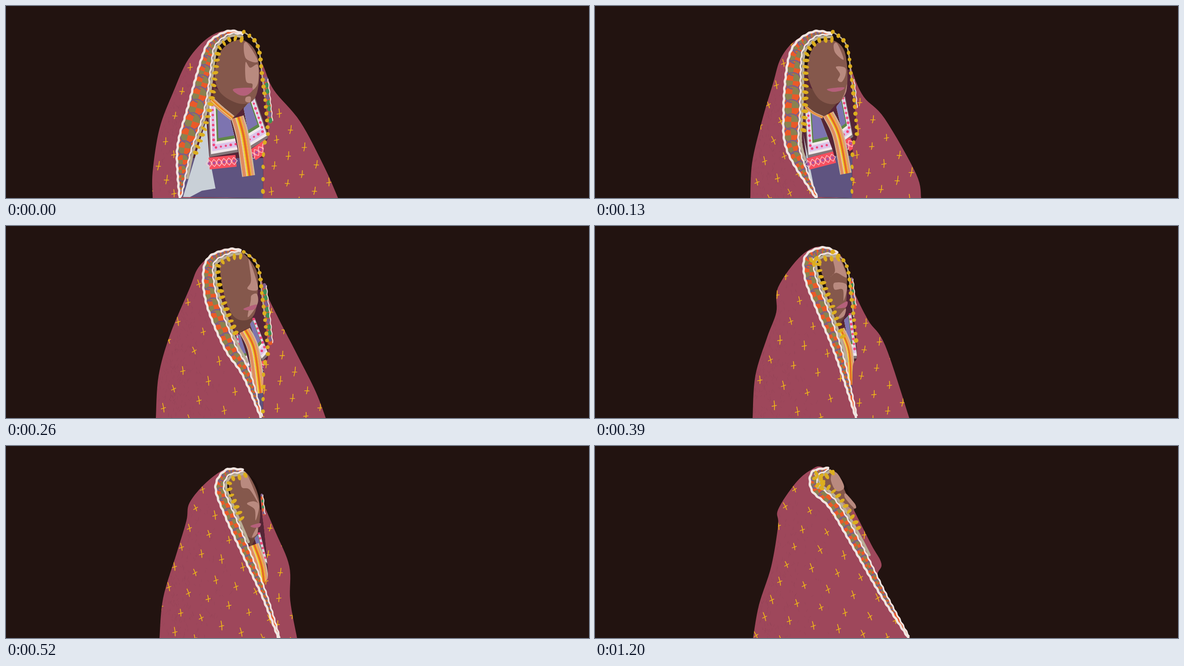
Recreate the animation shown at these times as an HTML page with a canvas. Size 1280 px wide and 423 px high, loop 1560 ms.

```html
<!DOCTYPE html>
<html lang="en">
<head>
<meta charset="utf-8">
<title>Turning figure</title>
<style>
html, body { margin: 0; width: 100%; height: 100%; overflow: hidden; background: #221310; }
canvas { display: block; width: 100vw; height: 100vh; }
</style>
</head>
<body>
<canvas id="stage" width="1280" height="423"></canvas>
<script>
const ctx = document.getElementById('stage').getContext('2d');
const W = 1280, H = 423, STEP = 130, LOOP = 1560;
const C = {
  night: '#221310', shawl: '#9e475b', shade: '#75374a', hair: '#1b0e0c', wine: '#552536',
  skin: '#85584c', neck: '#6b443a', light: '#b98a7f', lips: '#b5607a',
  cream: '#f1e5e1', beige: '#b9ad96', orange: '#ea5a28', ring: '#7d5d88', olive: '#8a8250',
  gold: '#dcae1f', stitch: '#f0b816', leaf: '#3f8e56', dress: '#5f5480', sleeve: '#c9d0d7',
  red: '#f8505f', pink: '#f0457a'
};
// Nested layers of an embroidered panel: size and colour
const PANEL = [[1, '#85777a'], [0.93, '#f1e8eb'], [0.86, '#dcc3e8'], [0.7, '#f1e8eb'], [0.63, '#5f8748'], [0.55, '#7d74b0']];
// Stripes across the front placket: weight and colour
const STRIPES = [[2, '#cfc0a0'], [7, '#e08b60'], [2, '#e8c9a8'], [3, '#f0d12c'], [5, '#e66a26'], [2, '#f0c02c'], [5, '#e59a70'], [2, '#cfc0a0']];
// The far side of the hood opening is common to all poses
const EDGE = '522 57 545 75 556 100 562 150 568 200 575 285 566 312 564 423';

// Key points of each pose. border: greatest width and where it lies;
// fringe, rim: how far down the beads reach; marks: lattice origin and its two steps.
const poses = [
  {
    shawl: '322 423 322 365 337 270 367 190 400 118 445 69 490 54 535 70 564 130 588 185 646 255 700 357 729 423',
    outer: '520 60 488 55 447 78 428 120 400 220 376 315 381 423', border: [34, 1.25],
    fringe: 331, rim: 423, side: [160, 255, 9],
    neck: '456 180 454 208 500 247 532 213',
    face: '458 145 475 95 515 74 548 100 556 155 545 205 512 215 470 190',
    lights: ['522 86 530 82 553 122 527 116', '526 124 536 136 553 130 553 170 540 186 541 172 527 165', '527 201 537 200 536 212 526 210'],
    lips: '499 183 541 181 530 196 512 196',
    waist: 335, sleeve: '440 250 410 350 388 423 400 423 430 407 460 402 446 330',
    panels: ['490 240 443 212 447 333 510 322', '522 225 546 199 577 290 538 314'],
    belts: ['446 347 505 341', '541 329 576 305'],
    plackets: [['450 206 474 228 500 249', 12], ['508 245 520 290 533 377', 28]],
    marks: [406, 135, -18, 54, 0, 85], far: [598, 235], lean: 6
  },
  {
    shawl: '341 423 345 345 366 255 391 170 408 115 440 76 490 54 545 75 565 145 590 200 636 248 705 370 716 423',
    outer: '520 60 480 56 440 82 422 130 414 230 422 320 485 423', border: [33, 1],
    fringe: 290, rim: 423, side: [160, 225, 4],
    neck: '462 175 464 222 503 246 533 212',
    face: '466 145 480 90 515 74 548 100 553 180 530 215 490 203',
    lights: ['524 86 532 83 546 118 528 104', '529 134 549 136 550 152 542 167 533 163 538 150', '553 172 551 190 540 210 548 192'],
    lips: '510 183 546 179 541 186 522 189',
    waist: 330, sleeve: '457 280 474 405 481 400 468 335',
    panels: ['495 247 460 226 467 334 523 321', '530 222 549 198 567 288 548 302'],
    belts: ['468 348 526 333', '552 309 566 300'],
    plackets: [['462 222 480 236 502 246', 6], ['512 238 534 285 551 370', 25]],
    marks: [414, 127, -17, 45, 10, 80], far: [583, 213], lean: -16
  },
  {
    shawl: '329 423 335 330 360 240 402 140 422 92 455 62 490 50 545 72 568 140 600 207 640 285 680 365 702 423',
    outer: '515 53 490 51 447 67 433 105 441 175 480 270 520 330 560 423', border: [24, 0.9],
    fringe: 250, rim: 423, side: [130, 258, 9],
    neck: '490 190 505 238 538 222 542 200',
    face: '469 84 490 62 515 56 546 90 553 125 545 195 510 206 484 170',
    lights: ['533 72 552 128 550 142 530 138 538 120', '539 153 551 150 552 172 531 201 537 166'],
    lips: '522 182 549 173 546 183 530 186',
    waist: 318,
    panels: ['514 240 505 238 518 320 537 312', '536 216 546 202 577 283 563 298'],
    belts: ['523 328 540 324', '564 311 576 306'],
    plackets: [['524 230 544 275 557 370', 25]],
    marks: [422, 125, -22, 42, 34, 66], far: [583, 188], lean: -12
  },
  {
    shawl: '346 423 352 330 378 245 398 190 402 135 453 65 500 45 545 72 567 140 600 208 637 263 690 423',
    outer: '532 58 500 47 462 66 461 115 487 185 528 285 573 423', border: [21, 0.65],
    fringe: 250, rim: 262, side: [115, 180, 6],
    neck: '520 185 530 228 548 200',
    face: '493 77 525 56 550 95 553 130 548 195 528 198 505 125',
    lights: ['519 58 533 63 553 112 530 103 517 112 527 98', '526 125 553 130 546 165 544 140 526 140', '550 182 547 198 532 204'],
    lips: '530 180 553 166 552 178 540 181',
    waist: 310,
    panels: ['529 245 520 242 528 303 547 297', '547 207 563 191 577 292 563 292'],
    belts: ['529 313 551 309'],
    plackets: [['538 228 556 275 561 352', 20]],
    marks: [420, 108, -22, 43, 30, 57], far: [596, 215], lean: -7
  },
  {
    shawl: '337 423 345 335 375 235 396 165 403 125 440 80 485 50 525 58 552 100 592 190 622 265 624 340 639 423',
    outer: '520 52 482 53 460 90 480 152 530 262 564 335 598 423', border: [17, 0.65],
    fringe: 162, rim: 0, side: [108, 153, 5],
    neck: '520 180 537 225 553 192',
    face: '488 74 522 55 550 97 558 150 549 198 530 198 510 160',
    lights: ['517 57 530 64 556 128 535 96 517 90', '529 127 545 122 556 132 548 164 546 140', '551 179 552 193 540 201'],
    lips: '537 176 558 170 557 178 545 180',
    waist: H,
    panels: ['546 203 558 190 576 262 560 250'],
    belts: [],
    plackets: [['543 218 560 268 567 330', 25]],
    marks: [431, 94, -15, 43, 29, 57], far: [581, 180], lean: -14
  },
  {
    shawl: '347 423 360 350 387 265 402 175 402 140 440 82 472 54 500 47 545 90 568 140 607 218 629 260 623 300 692 423',
    outer: '512 48 476 58 476 98 514 135 562 215 625 325 688 423', border: [18, 0.65],
    fringe: 190, rim: 60,
    neck: '542 125 563 148 566 180',
    face: '494 80 515 57 533 62 553 108 572 130 563 148 562 160 530 122',
    lights: ['522 58 534 63 547 91 530 99 518 76', '551 105 572 130 569 137 549 114', '540 121 562 139 560 146 548 140'],
    waist: H,
    panels: [], belts: [], plackets: [],
    marks: [436, 95, -17, 39, 37, 48], far: [592, 193], lean: -18
  }
];

let seed = 1;
const rnd = () => (seed = seed * 16807 % 2147483647) / 2147483647;
const jitter = a => (rnd() * 2 - 1) * a;
const mix = (a, b, t) => a.map((v, k) => v + (b[k] - v) * t);

function points(text) {
  const n = text.split(' ').map(Number), out = [];
  for (let i = 0; i < n.length; i += 2) out.push([n[i], n[i + 1]]);
  return out;
}

// Catmull-Rom curve through the points
function curve(text, closed) {
  const p = points(text), n = p.length, out = [];
  const at = i => closed ? p[(i + n) % n] : p[Math.max(0, Math.min(n - 1, i))];
  for (let i = 0; i < (closed ? n : n - 1); i++) {
    const [a, b, c, d] = [at(i - 1), at(i), at(i + 1), at(i + 2)];
    for (let t = 0; t < 1; t += 0.125) {
      out.push([0, 1].map(k => b[k] + 0.5 * t * (c[k] - a[k] +
        t * (2 * a[k] - 5 * b[k] + 4 * c[k] - d[k] + t * (3 * (b[k] - c[k]) + d[k] - a[k])))));
    }
  }
  if (!closed) out.push(p[n - 1]);
  return out;
}

// Evenly spaced places on a path, each with its direction
function along(path, step) {
  const out = [];
  let left = 0;
  for (let i = 1; i < path.length; i++) {
    const [x, y] = path[i - 1], dx = path[i][0] - x, dy = path[i][1] - y, len = Math.hypot(dx, dy);
    for (; left < len; left += step) out.push({ x: x + dx * left / len, y: y + dy * left / len, a: Math.atan2(dy, dx) });
    left -= len;
  }
  return out;
}

// Parallel path; the distance may depend on the share of the way
function shift(path, dist, step = 3) {
  return along(path, step).map(({ x, y, a }, i, all) => {
    const d = typeof dist === 'function' ? dist(i / all.length, i) : dist;
    return [x - Math.sin(a) * d, y + Math.cos(a) * d];
  });
}
const between = (path, top, bottom) => path.filter(([, y]) => y >= top && y <= bottom);

function trace(path) {
  ctx.beginPath();
  path.forEach(([x, y]) => ctx.lineTo(x, y));
}
function fill(color, path) {
  trace(path);
  ctx.closePath();
  ctx.fillStyle = color;
  ctx.fill();
}
function stroke(color, width, path) {
  trace(path);
  ctx.strokeStyle = color;
  ctx.lineWidth = width;
  ctx.stroke();
}
function dot(color, x, y, rx, ry = rx, a = 0) {
  ctx.beginPath();
  ctx.ellipse(x, y, rx, ry, a, 0, 7);
  ctx.fillStyle = color;
  ctx.fill();
}
function clipped(path, draw) {
  ctx.save();
  trace(path);
  ctx.clip();
  draw();
  ctx.restore();
}
const rightOf = path => [[path[0][0], 0], ...path, [W, H], [W, 0]];
const leftOf = path => [[path[0][0], 0], ...path, [0, H], [0, 0]];

const ruffle = (path, width) => stroke(C.cream, width, shift(path, (s, i) => Math.sin(i * 0.8) * 0.7, 2));

function border(outer, inner) {
  const shape = [...outer, ...inner.slice().reverse()];
  fill(C.orange, shape);
  clipped(shape, () => {
    const a = along(outer, 1), b = along(inner, 1);
    for (let s = 0.02, r; s < 1; s += Math.max(r * 1.75, 7) / a.length) {
      const p = a[Math.floor(s * a.length)], q = b[Math.floor(s * b.length)];
      const x = (p.x + q.x) / 2, y = (p.y + q.y) / 2;
      r = Math.hypot(p.x - q.x, p.y - q.y) / 2;
      if (r < 4) continue;
      ctx.fillStyle = C.olive;
      for (const turn of [0, Math.PI]) {
        ctx.beginPath();
        ctx.moveTo(x, y);
        ctx.arc(x, y, r, p.a + turn, p.a + turn + Math.PI / 2);
        ctx.fill();
      }
      ctx.strokeStyle = C.ring;
      ctx.lineWidth = 2.6;
      ctx.beginPath();
      ctx.arc(x, y, r, 0, 7);
      ctx.stroke();
    }
  });
}

function placket([text, width]) {
  const path = curve(text), unit = width / STRIPES.reduce((sum, [w]) => sum + w, 0);
  let d = width / 2;
  ctx.lineCap = 'butt';
  for (const [w, color] of STRIPES) {
    stroke(color, w * unit + 0.5, shift(path, d - w * unit / 2));
    d -= w * unit;
  }
  ctx.lineCap = 'round';
}

// Layers shrink towards the first corner; dots run round the two far sides
function panel(text) {
  const corners = points(text), scaled = k => corners.map(c => mix(corners[0], c, k));
  PANEL.forEach(([k, color]) => fill(color, scaled(k)));
  along(scaled(0.78).slice(1), 11).forEach(({ x, y }) => dot(C.pink, x, y, 2.7 + jitter(0.4)));
}

function belt(text) {
  const path = points(text);
  ctx.lineCap = 'butt';
  stroke(C.red, 26, path);
  ctx.lineCap = 'round';
  for (const { x, y, a } of along(path, 11)) {
    ctx.save();
    ctx.translate(x, y);
    ctx.rotate(a);
    dot('#b0509c', 0, 0, 3);
    stroke('#f7c8d2', 1.4, [[-7, 0], [0, -8], [7, 0], [0, 8], [-7, 0]]);
    ctx.restore();
  }
}

function beads(path, step, rx, ry) {
  for (const { x, y, a } of along(path, step)) {
    dot(C.gold, x, y, rx + jitter(0.8), ry + jitter(0.6), a + Math.PI / 2 + jitter(0.3));
  }
}

function stitch(x, y, lean) {
  ctx.save();
  ctx.translate(x, y);
  ctx.rotate((lean + jitter(9)) * Math.PI / 180);
  const h = 8.5 + jitter(1.5);
  stroke(C.stitch, 1.7, [[0, -h], [0.7, 0], [0, h]]);
  stroke(C.stitch, 1.6, [[-5, 2], [5, 0.5]]);
  ctx.restore();
}

function stitches([x, y, ux, uy, vx, vy], lean) {
  for (let j = 0; j < 9; j++) {
    for (let i = -2; i < 9; i++) stitch(x + i * ux + j * vx + jitter(2), y + i * uy + j * vy + jitter(2), lean);
  }
}

function texture() {
  ctx.globalAlpha = 0.16;
  for (let i = 0; i < 420; i++) {
    const x = 330 + 170 * rnd() * rnd() + rnd() * 40, y = 120 + rnd() * 303;
    stroke(C.shade, 1, [[x, y], [x + jitter(4), y + 2 + rnd() * 6]]);
  }
  ctx.globalAlpha = 1;
}

function sideTrim(edge, [top, bottom, width]) {
  const path = between(shift(edge, -width * 0.8), top, bottom);
  stroke(C.orange, width, path);
  along(path, 13).forEach(({ x, y }, i) => dot(i % 3 ? C.leaf : C.ring, x, y, width / 2, width * 0.7));
  ruffle(shift(path, -width / 2), 2);
}

function clothes(p) {
  ctx.fillStyle = C.wine;
  ctx.fillRect(0, 140, W, H);
  ctx.fillStyle = C.dress;
  ctx.fillRect(0, p.waist, W, H);
  if (p.sleeve) fill(C.sleeve, points(p.sleeve));
  fill(C.neck, points(p.neck));
  p.panels.forEach(panel);
  p.belts.forEach(belt);
  p.plackets.forEach(placket);
}

function figure(p) {
  const shawl = curve(p.shawl), outer = curve(p.outer), edge = curve(EDGE);
  const [wide, skew] = p.border;
  const inner = shift(outer, s => -3 - wide * Math.sin(Math.PI * s ** skew));
  const strip = shift(inner, -5);
  const opening = [...inner, ...edge.slice().reverse()];

  fill(C.shawl, shawl);
  clipped(shawl, () => {
    texture();
    clipped(leftOf(outer), () => stitches(p.marks, p.lean));
    clipped(rightOf(outer), () => clipped(rightOf(edge), () => stitches([...p.far, -5, 58, 28, 38], 5)));
  });
  if (p.side) sideTrim(edge, p.side);
  clipped(rightOf(outer), () => {
    fill(C.hair, opening);
    clipped(opening, () => clothes(p));
    fill(C.skin, curve(p.face, true));
    p.lights.forEach(text => fill(C.light, curve(text, true)));
    if (p.lips) fill(C.lips, curve(p.lips, true));
  });
  stroke(C.beige, 3, between(edge, 0, Math.min(p.rim, 200)));
  border(outer, inner);
  stroke(C.beige, 6, between(strip, 0, p.fringe + 50));
  ruffle(inner, 3.5);
  ruffle(outer, 5);
  beads(between(shift(strip, -6), 0, p.fringe), 14, 6.8, 3.7);
  beads(between(edge, 0, Math.min(p.rim, 290)), 15, 4.4, 4.4);
  beads(between(edge, 300, p.rim), 27, 3.6, 5);
}

ctx.lineCap = ctx.lineJoin = 'round';
let shown = -1;
function tick() {
  const pose = Math.min(poses.length - 1, Math.floor(performance.now() % LOOP / STEP));
  if (pose !== shown) {
    shown = pose;
    seed = 71 + pose;
    ctx.fillStyle = C.night;
    ctx.fillRect(0, 0, W, H);
    figure(poses[pose]);
  }
  requestAnimationFrame(tick);
}
tick();
</script>
</body>
</html>
```
